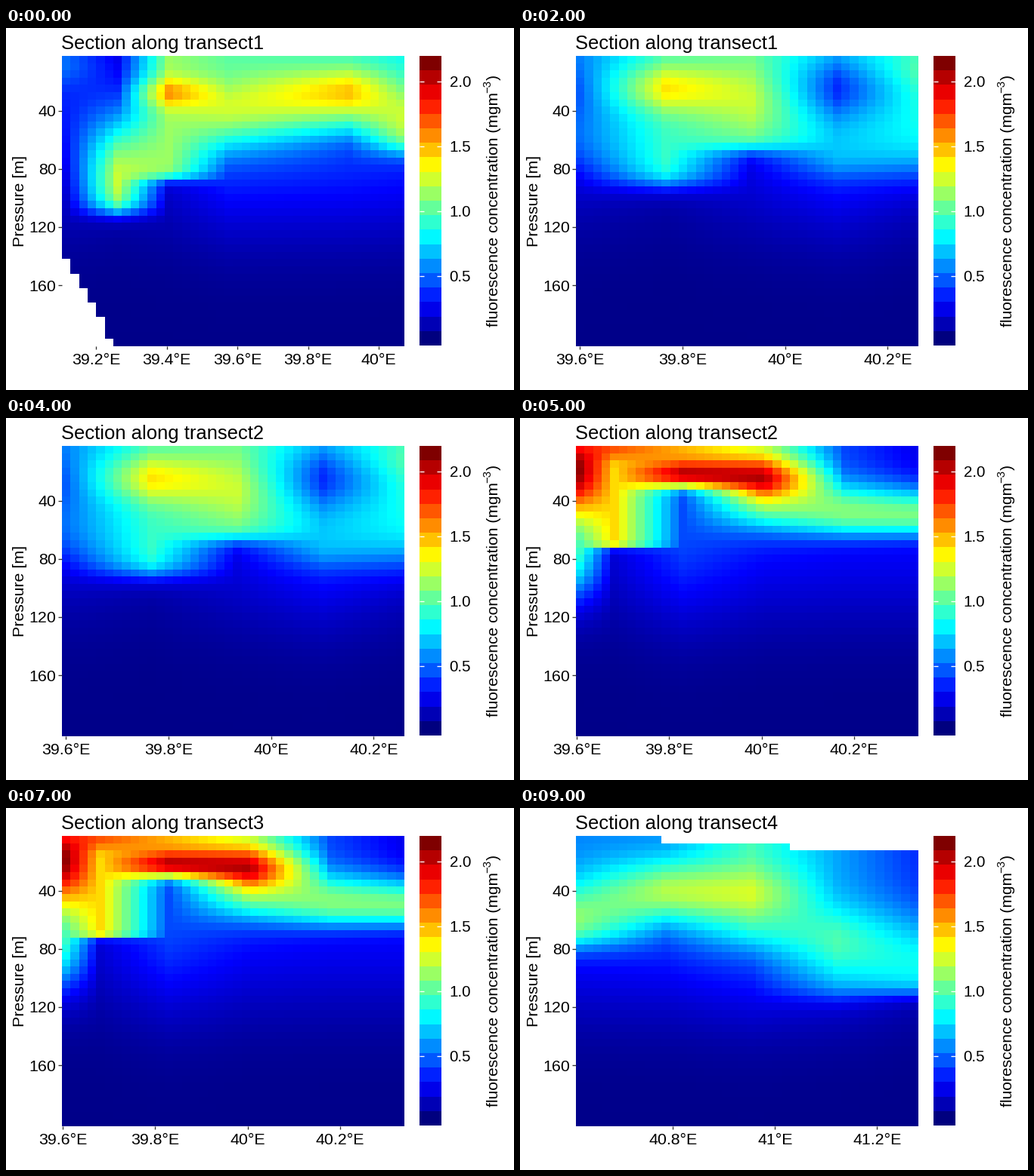
A matplotlib script that plays this animation: 672 px wide and 480 px high, repeating every 10000 ms.

```python
import numpy as np
import matplotlib.pyplot as plt
from matplotlib.animation import FuncAnimation

W, H, DPI = 672, 480, 96
LEFT, RIGHT, TOP, BOTTOM = 73.6, 526.4, 37.4, 422
N = 40
VMIN, VMAX = 0.02, 2.142
DEPTH = np.arange(1, N + 1) * 5

plt.rcParams["font.family"] = "Liberation Sans"


def jet(v):
    t = np.clip((np.asarray(v) - VMIN) / (VMAX - VMIN), 0, 1)
    return np.stack([np.clip(1.5 - abs(4 * t - c), 0, 1) for c in (3, 2, 1)], axis=-1)


def profile(level, peak, at, width, base, fall, below):
    """Bump of height peak on a level that falls off at base to a fading deep value."""
    body = level + (peak - level) * np.exp(-((DEPTH - at) / width) ** 2)
    deep = .04 + below * np.exp(-(np.maximum(DEPTH - 60, 0) / 62) ** 2)
    mix = 1 / (1 + np.exp(np.clip((DEPTH - base) / fall, -50, 50)))
    return mix * body + (1 - mix) * deep


def section(stations):
    """Interpolate between the station columns and colour the N x N grid."""
    cols = list(stations)
    profiles = np.array([profile(*p) for p in stations.values()])
    return jet([np.interp(np.arange(N), cols, row) for row in profiles.T])


# column: level, peak, peak depth, peak width, base depth, fall, value below
coast = section({0: (.35, .52, 8, 15, 75, 15, .18),
                 6: (.22, 1.24, 88, 45, 111, 3, .15),
                 12: (1.14, 1.58, 28, 10, 87, 2, .2),
                 19: (1, 1.27, 38, 18, 66, 7, .38),
                 33: (.9, 1.48, 28, 17, 57, 5, .36),
                 39: (.8, 1.24, 44, 28, 69, 4, .33)})
shelf = section({0: (.57, .48, 30, 20, 78, 9, .15),
                 10: (.93, 1.4, 25, 16, 91, 4, .1),
                 20: (1.02, 1.24, 33, 22, 67, 3, .22),
                 30: (.72, .37, 25, 20, 82, 5, .36),
                 39: (.85, .97, 10, 15, 80, 8, .2)})
slope = section({0: (.95, 2.1, 19, 30, 100, 10, .15),
                 4: (1.42, 1.7, 5, 7, 72.5, 1, .18),
                 12: (1.5, 2.05, 22, 8, 31, 2, .4),
                 21.5: (1.15, 2.06, 25, 14, 57, 6, .27),
                 31: (.42, 1.1, 48, 20, 67, 4, .25),
                 39: (.25, 1.08, 50, 19, 68, 4, .25)})
offshore = section({0: (.56, 1.12, 60, 28, 79, 5, .31),
                    10: (.57, 1.2, 41, 22, 72, 7, .34),
                    20: (.95, 1.27, 42, 18, 76, 6, .47),
                    30: (.63, .98, 75, 25, 113, 4, .36),
                    39: (.38, .84, 90, 34, 112, 3, .2)})

# sea floor and missing surface readings
for c in range(6):
    coast[28 + 2 * c + c // 5:, c] = 1
offshore[0, 10:] = 1
offshore[1, 25:] = 1

# grid, first tick longitude, its x, tick spacing in px, tick count
SECTIONS = [(coast, 39.2, 119.3, 93.4, 5), (shelf, 39.6, 79, 135.8, 4),
            (slope, 39.6, 75, 122.3, 4), (offshore, 40.8, 202.3, 135, 3)]

fig = plt.figure(figsize=(W / DPI, H / DPI), dpi=DPI, facecolor="white")
ax = fig.add_axes([0, 0, 1, 1])
ax.axis("off")


def label(x, y, s, px=21.33, **kw):
    return ax.text(x, y, s, fontsize=px * 72 / DPI, color="black", va="baseline", **kw)


def vertical(x, y, s, px=21.33):
    return label(x, y, s, px, rotation=90, rotation_mode="anchor")


def line(x0, y0, x1, y1, color="#333333"):
    return ax.plot([x0, x1], [y0, y1], color=color, lw=1, solid_capstyle="butt")[0]


def picture(grid, box):
    return ax.imshow(grid, extent=box, aspect="auto", origin="upper",
                     interpolation="nearest")


heat = picture(coast, (LEFT, RIGHT, BOTTOM, TOP))
picture(jet(np.linspace(VMAX, VMIN, 20))[:, None], (547, 576, 421, 37.3))

for depth in (40, 80, 120, 160):
    y = 109.5 + (depth - 40) * 1.93
    line(69, y, 73.5, y)
    label(66.5, y + 7.5, str(depth), ha="right")

for v in (.5, 1, 1.5, 2):
    y = 243 - (v - 1) * 172
    line(547, y, 553, y, "white")
    line(570, y, 576, y, "white")
    label(586.5, y + 7.4, f"{v:.1f}", 20.6)

vertical(24.5, 290, "Pressure [m]")
vertical(651, 395.5, "fluorescence concentration (mgm", 21)
vertical(641, 86, "\u22123", 14.9)
vertical(651, 69, ")", 21)

title = label(73, 28, "", 25.6)
ticks = [(line(0, 0, 0, 0), label(0, 446, "", ha="center")) for _ in range(5)]

ax.set_xlim(0, W)
ax.set_ylim(H, 0)


def draw(i):
    # the title names the last state passed, the data show the nearest one
    title.set_text(f"Section along transect{i // 3 + 1}")
    grid, lon, x0, step, count = SECTIONS[round(i / 3)]
    heat.set_data(grid)
    for k, (mark, text) in enumerate(ticks):
        x = x0 + k * step
        mark.set_data([x, x], [421.5, 425.5])
        text.set_x(x)
        text.set_text(f"{round(lon + .2 * k, 1):g}°E")
        mark.set_visible(k < count)
        text.set_visible(k < count)
    return [heat, title]


anim = FuncAnimation(fig, draw, frames=10, interval=1000, repeat=True,
                     repeat_delay=0, init_func=lambda: draw(0), blit=False)
plt.show()
```
